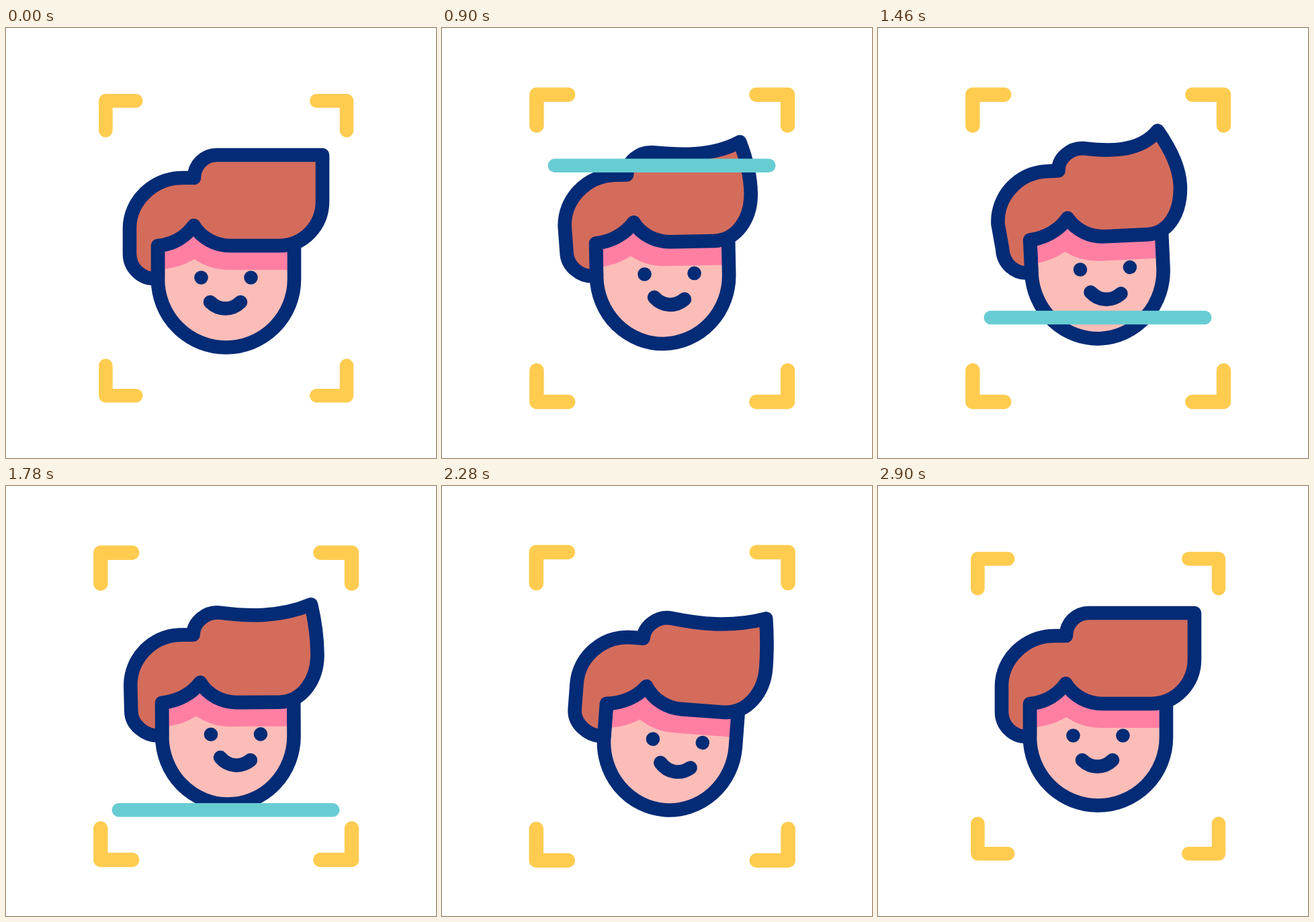
An HTML page for the animation above (3.1 s loop, 640 px wide and 640 px high).

```html
<!DOCTYPE html>
<html lang="en">
<head>
<meta charset="utf-8">
<title>Face scan</title>
<style>
  html, body { margin: 0; width: 100%; height: 100%; overflow: hidden; background: #fff; }
  svg { display: block; width: 100vw; height: 100vh; }
  .line { fill: none; stroke: #032b76; }
</style>
</head>
<body>
<svg viewBox="0 0 640 640" stroke-width="20.6" stroke-linecap="round" stroke-linejoin="round">
  <g id="brackets" fill="none" stroke="#ffcc50">
    <path d="M148.4 152.5V108.4H193.3M462.3 108.4H507V152.5M507 502.5V547.2H462.3M193.3 547.2H148.4V502.5"/>
  </g>
  <g id="head">
    <path id="brow" fill="#ff7fa3"/>
    <path id="skin" fill="#fcbdb8"/>
    <path id="jaw" class="line"/>
    <path id="hair" fill="#d46c5c" stroke="#032b76"/>
    <g id="features">
      <circle cx="290.5" cy="371.5" r="10.3" fill="#032b76"/>
      <circle cx="364.5" cy="371.5" r="10.3" fill="#032b76"/>
      <path id="mouth" class="line" d="M304 408C317 420.7 336 420.7 349 408"/>
    </g>
  </g>
  <path id="bar" fill="none" stroke="#68cdd3"/>
</svg>
<script>
const LOOP = 3100;
const CENTER = 327.7;
const el = Object.fromEntries([...document.querySelectorAll('[id]')].map(n => [n.id, n]));

// Eased 0..1 progress between two times
function ease(t, from, to) {
  const x = Math.min(1, Math.max(0, (t - from) / (to - from)));
  return x * x * (3 - 2 * x);
}

function drawHead(turn, lift, drop) {
  const left = 226 + 0.45 * turn;
  const rx = (429 - left) / 2;
  const chin = `V374A${rx} 101.5 0 0 1 ${left} 374`;

  el.brow.setAttribute('d', `M${left} 300H429${chin}Z`);
  el.jaw.setAttribute('d', `M429 324${chin}V324`);

  const dent = 280 + 0.25 * turn;
  el.skin.setAttribute('d',
    `M${left} 360Q${dent - 22} 358 ${dent} 344Q${dent + 24} 360 ${dent + 52} 360H429${chin}Z`);

  const peak = 279.5 + 0.7 * turn;
  const side = 184 + 0.15 * turn;
  const nape = side + 5 * lift;
  const tip = [471 - 0.73 * turn - 30 * lift, 189 - 0.58 * turn - 10 * lift];
  const edge = [471 - 0.37 * turn - 5.5 * lift, 258 - 0.3 * turn - lift];
  const crestY = 189 + 1.5 * lift;
  el.hair.setAttribute('d', [
    `M${left} 324C${left + 23} 322 ${peak - 12.5} 311 ${peak} 294`,
    `C${peak + 11.5} 313 ${peak + 32.5} 324 ${peak + 54.5} 324H407`,
    `C443 324 ${edge[0]} ${edge[1] + 36} ${edge}`,
    `Q${edge[0]} ${edge[1] - 35} ${tip}`,
    `C${419 - 0.73 * turn - 7 * lift} ${189 + 0.6 * turn + 5 * lift}`,
    `${366 - 0.4 * turn - 8 * lift} ${189 + 0.43 * turn + 1.5 * lift}`,
    `${314 + 0.4 * turn} ${crestY + 0.08 * turn}`,
    `C${295 + 0.33 * turn} ${crestY - 0.1 * turn} 280 204 280 223H263`,
    `C219 223 ${side} 258 ${side} 298L${nape} 336C${nape} 357 ${left - 25} 373 ${left - 5} 373`,
    `L${left} 373Z`
  ].join(' '));

  el.features.setAttribute('transform', `translate(${turn} 0)`);
  el.mouth.setAttribute('transform', `rotate(${0.36 * turn} 326.5 411)`);
  el.head.setAttribute('transform',
    `translate(${1.3 * drop} ${6.5 * drop - 13.2 * lift}) rotate(${4.25 * drop - 2.7 * lift} 328 467)`);
}

function drawBrackets(t) {
  const scale = 1 + 0.042 * ease(t, 120, 560) + 0.078 * ease(t, 2250, 2500) - 0.12 * ease(t, 2500, 2820);
  el.brackets.setAttribute('transform',
    `translate(${CENTER} ${CENTER}) scale(${scale}) translate(${-CENTER} ${-CENTER})`);
}

function drawBar(t) {
  const half = 159.2 * (ease(t, 590, 790) - ease(t, 1790, 1980));
  const y = 143 + 339.3 * ease(t, 585, 1746);
  el.bar.setAttribute('d', `M${327 - half} ${y}H${327 + half}`);
  el.bar.style.display = half > 0.5 ? '' : 'none';
}

function render(t) {
  const back = ease(t, 2280, 2820);
  drawHead(
    15 * (ease(t, 120, 1140) - back),
    ease(t, 500, 1400) - ease(t, 1440, 1890),
    ease(t, 1740, 2260) - back
  );
  drawBrackets(t);
  drawBar(t);
}

const start = performance.now();
function tick() {
  render((performance.now() - start) % LOOP);
  requestAnimationFrame(tick);
}
tick();
</script>
</body>
</html>
```
